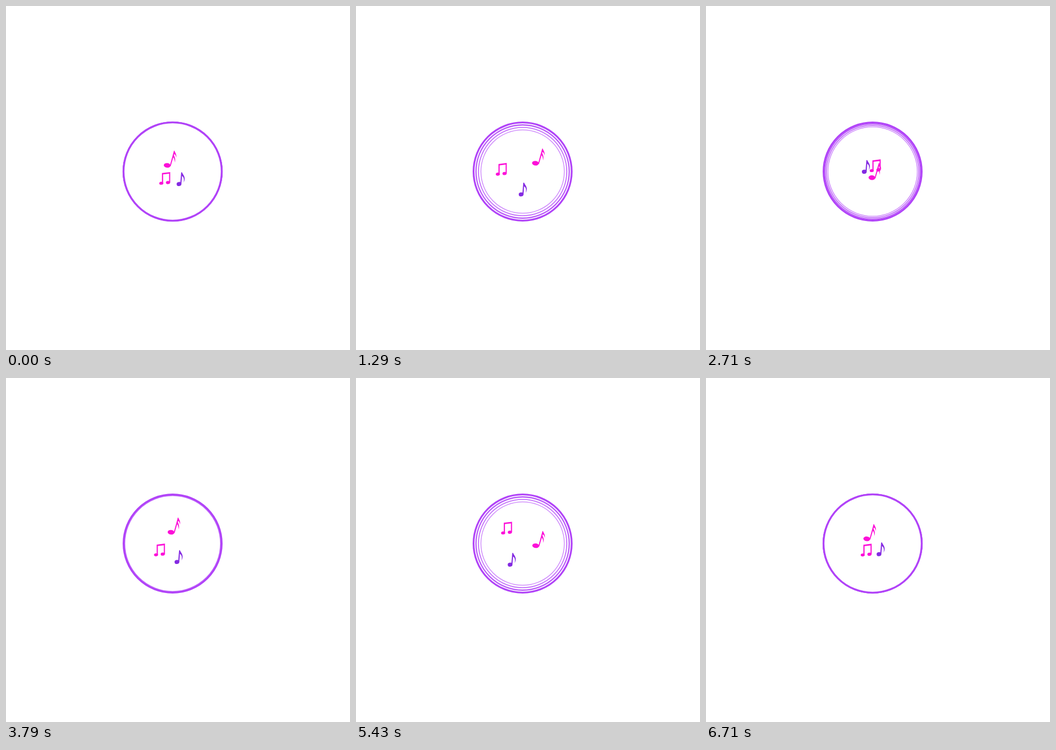
Write an HTML page with a canvas that moves like this. It is 640 by 640 pixels and loops after 6.78 s.

```html
<!DOCTYPE html>
<html lang="en">
<head>
<meta charset="utf-8">
<title>Music notes in a pulsing ring</title>
<style>
html, body { margin: 0; width: 100%; height: 100%; overflow: hidden; background: #fff; }
canvas { display: block; width: 100vw; height: 100vh; }
</style>
</head>
<body>
<canvas id="stage" width="640" height="640"></canvas>
<script>
const ctx = document.getElementById('stage').getContext('2d');
const TURN = Math.PI * 2, DEG = TURN / 360;
const LOOP = 6780, STEP = LOOP / 95, HALF = LOOP / 2;
const CX = 310, CY = 308, RADIUS = 91.3;
const PINK = '#fc0fd8', VIOLET = '#842ae2', RING = '#b143f8';

// Each note circles its own centre; its angle lags by up to 2 * lag degrees per lap.
const NOTES = [
  {
    color: PINK, size: [23, 32],
    orbit: { x: 13, y: -16.5, r: 19, angle: 199, lag: 9, shift: 0 },
    heads: [[6.3, 27.2, 6.3, 4.3, 0.1]],
    body: 'M11.2 28 L18.9 0 L20 0 C20.3 3 24.6 6 23 13 C22.6 8.5 21 7 19.4 6.2 L18.9 8' +
          ' C19.5 11 22.6 13.5 20.6 22 C20.2 16.5 19.2 14 17.7 12.2 L12.9 28.6 Z'
  },
  {
    color: PINK, size: [20, 24],
    orbit: { x: -18, y: -9.5, r: 22.6, angle: 84, lag: 32, shift: 20 },
    heads: [[3.8, 20.9, 3.8, 2.8, -0.1], [16.3, 19.6, 3.9, 2.9, -0.1]],
    body: 'M5 1.9 L20.4 0 V19.6 H18.3 V3.1 L7.2 4.4 V21 H5 Z'
  },
  {
    color: VIOLET, size: [15, 26],
    orbit: { x: -7, y: 13, r: 22, angle: 4, lag: 44, shift: -4 },
    heads: [[4.4, 21.7, 4.4, 3.8, -0.1]],
    body: 'M8.5 0 L10.2 0 C10.8 4 18.6 8.5 13 18.8 C14.6 11.5 12.6 8.5 10 6.8 L8.8 22 L6.6 22 Z'
  }
].map(note => ({ ...note, body: new Path2D(note.body) }));

const smooth = x => {
  x = Math.min(1, Math.max(0, x));
  return x * x * (3 - 2 * x);
};

function drawRings(t) {
  const phase = t % HALF;
  const open = smooth(Math.min(phase, HALF - phase) / 1300);
  ctx.strokeStyle = RING;
  for (let i = 3; i >= 0; i--) {
    const rest = i ? 1.008 : 1;
    const scale = rest + (1 - 0.05 * i - rest) * open;
    ctx.globalAlpha = 1 - 0.13 * i;
    ctx.lineWidth = i ? 2.7 - 0.4 * i : 3.3;
    ctx.beginPath();
    ctx.arc(CX, CY, RADIUS * scale, 0, TURN);
    ctx.stroke();
  }
  ctx.globalAlpha = 1;
}

// Two laps per loop, the first slightly ahead and the second slightly behind.
function lapAngle(t) {
  return (t + 85 * Math.sin(TURN * t / LOOP)) / HALF * TURN;
}

function drawNote({ color, size, orbit, heads, body }, lap) {
  const lag = orbit.lag * (1 - Math.cos(lap + orbit.shift * DEG));
  const angle = lap + (orbit.angle - lag) * DEG;
  ctx.save();
  ctx.translate(CX + orbit.x + orbit.r * Math.cos(angle) - size[0] / 2,
                CY + orbit.y + orbit.r * Math.sin(angle) - size[1] / 2);
  ctx.fillStyle = color;
  ctx.fill(body);
  for (const head of heads) {
    ctx.beginPath();
    ctx.ellipse(...head, 0, TURN);
    ctx.fill();
  }
  ctx.restore();
}

function draw(now) {
  const t = Math.floor((now % LOOP) / STEP) * STEP;
  ctx.fillStyle = '#fff';
  ctx.fillRect(0, 0, 640, 640);
  drawRings(t);
  for (const note of NOTES) drawNote(note, lapAngle(t));
}

const start = performance.now();
function tick() {
  draw(performance.now() - start);
  requestAnimationFrame(tick);
}
tick();
</script>
</body>
</html>
```
